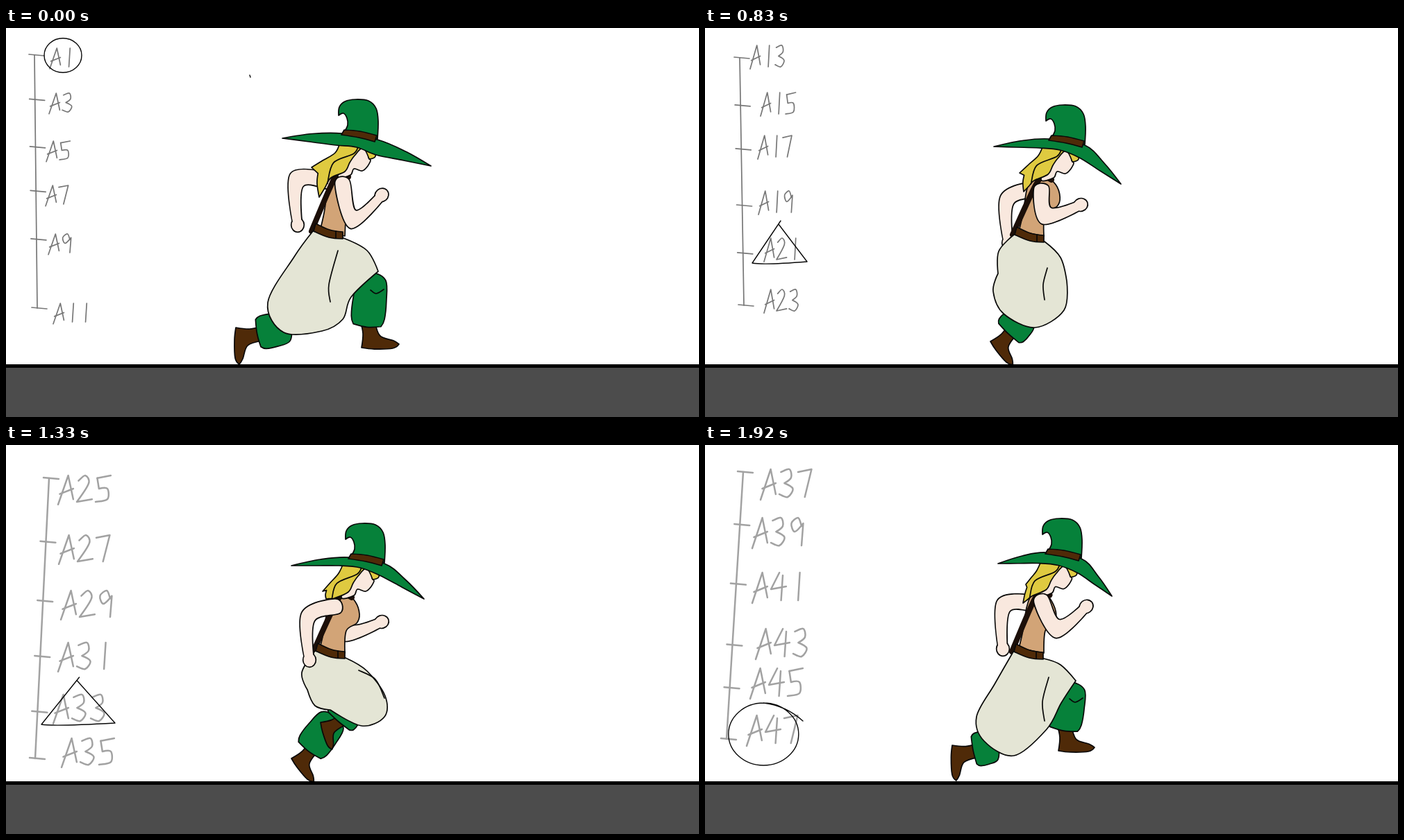
Write an HTML page with a canvas that moves like this. It is 998 px wide and 561 px high and loops after 2 s.

```html
<!DOCTYPE html>
<html lang="en">
<head>
<meta charset="utf-8">
<title>Run cycle</title>
<style>
html, body { margin: 0; height: 100%; overflow: hidden; background: #fff; }
canvas { display: block; width: 100vw; height: 100vh; }
</style>
</head>
<body>
<canvas id="stage" width="998" height="561"></canvas>
<script>
const ctx = document.getElementById('stage').getContext('2d');
const green = '#06813a', brown = '#4f2a08', skin = '#f9e8de', ink = '#080808';

// "x,y" is a smooth point, "x,y!" a corner
const points = s => s.split(' ').map(t => {
  const [x, y] = t.match(/-?\d+/g).map(Number);
  return { x, y, sharp: t.endsWith('!') };
});
const at = (x, y, sharp) => ({ x, y, sharp });
const corner = p => at(p.x, p.y, true);
const lerp = (a, b, k) => at(a.x + (b.x - a.x) * k, a.y + (b.y - a.y) * k, a.sharp);
const shift = (pts, o, k = 1) => pts.map(p => at(p.x + o.x * k, p.y + o.y * k, p.sharp));
// turn and scale local points by the vector (ux, uy), then move them to o
const place = (pts, o, ux, uy) => pts.map(p =>
  at(o.x + p.x * ux - p.y * uy, o.y + p.x * uy + p.y * ux, p.sharp));

// Key poses. head: offset, brim: tips, hair: tips, legs: heel, toe, knee
const pose = o => Object.fromEntries(Object.entries(o).map(([k, s]) => [k, points(s)]));
const reach = pose({
  head: '0,0', brim: '398,159 612,199', hair: '440,201 451,244', hip: '446,282',
  skirt: '520,321 536,351! 497,388 485,420 455,437 400,439 377,396 415,330',
  fold: '478,321 465,370 467,395',
  trail: '331,432 331,485 405,432', lead: '512,461 566,461 527,362'
});
const land = pose({
  head: '5,4', brim: '411,170 593,222', hair: '442,210 444,244', hip: '452,288',
  skirt: '505,326 526,362 520,388! 519,420 475,436 437,421 423,365 422,322',
  fold: '512,387 519,388 525,382',
  trail: '380,366 365,411 432,392', lead: '468,484 521,484 485,420'
});
const tuck = pose({
  head: '10,10', brim: '411,174 602,222', hair: '456,211 461,222', hip: '449,286',
  skirt: '520,326 546,362 545,392 512,405 467,382! 445,376 434,353! 426,328',
  fold: '508,325 532,338 545,365',
  trail: '453,400 466,440 495,380', lead: '411,452 440,488 470,397'
});
const drive = pose({
  head: '12,8', brim: '416,171 599,225', hair: '453,209 459,236', hip: '449,287',
  skirt: '512,331 521,365! 517,407 475,432 430,412 415,380 422,354! 423,322',
  fold: '493,346 487,370 489,392',
  trail: '453,380 466,420 490,370', lead: '411,452 440,488 459,417'
});
const push = pose({
  head: '7,3', brim: '422,171 586,218', hair: '462,201 458,228', hip: '448,287',
  skirt: '512,317 534,340! 513,372 492,410 445,448 402,427 391,392 417,345',
  fold: '495,335 486,370 489,398',
  trail: '356,433 357,484 418,434', lead: '509,441 561,441 527,350'
});

const mid = (p, q) => p.map((a, i) => lerp(a, q[i], .5));
const mix = (a, b) => Object.fromEntries(Object.keys(a).map(k => [k, mid(a[k], b[k])]));
const fall = mix(reach, land);
const bodies = [reach, fall, land, mix(land, tuck), tuck, push,
  reach, fall, land, mix(land, drive), drive, push];

// Near arm: shoulder, elbow, fist; gaps lie halfway between neighbours.
// The far arm follows half a cycle later.
const passing = '485,230 466,265 500,297';
const swing = ['484,222 500,276 541,241', '', passing, '', '478,232 435,248 437,310',
  '474,228 430,232 429,294', '470,222 419,219 420,284', '', passing, '',
  '484,230 492,271 541,255', '483,222 508,265 549,233'].map(s => s && points(s));
const arms = swing.map((a, i) => a || mid(swing[i - 1], swing[i + 1]));

const shapes = pose({
  crown: '487,150! 492,140 491,130 486,123 479,126! 480,114 488,106 503,103 522,105 533,116 536,134 535,160!',
  band: '487,147! 510,149 534,155! 531,164! 508,158 483,154!',
  face: '505,170 526,172 522,186 525,191 521,199! 513,206 501,203 496,212 478,215 490,185',
  belt: '0,0! 20,9 39,12! 39,22! 19,20 -3,11!',
  boot: '-2,-38! 2,-20 0,0! 18,2 44,1 53,-5! 45,-10 26,-17 19,-38!',
  pants: '-14,0 0,20 45,24 85,24 102,20! 106,0 102,-20! 85,-24 45,-24 0,-20'
});
const cuff = points('8,-33');

function trace(p, closed) {
  const n = p.length;
  const near = i => closed ? p[(i + n) % n] : p[Math.max(0, Math.min(n - 1, i))];
  const handle = (i, d) => {
    const q = near(i), k = q.sharp ? 0 : d / 6;
    return [q.x + (near(i + 1).x - near(i - 1).x) * k, q.y + (near(i + 1).y - near(i - 1).y) * k];
  };
  ctx.moveTo(p[0].x, p[0].y);
  for (let i = 0; i < (closed ? n : n - 1); i++) {
    const b = near(i + 1);
    ctx.bezierCurveTo(...handle(i, 1), ...handle(i + 1, -1), b.x, b.y);
  }
  if (closed) ctx.closePath();
}
function shape(p, fill) {
  ctx.beginPath();
  trace(p, true);
  ctx.fillStyle = fill;
  ctx.fill();
  ctx.stroke();
}
function line(p) {
  ctx.beginPath();
  trace(p, false);
  ctx.stroke();
}
function pen(color, width) {
  ctx.strokeStyle = color;
  ctx.lineWidth = width;
}
const outline = () => pen(ink, 1.7);

function arm([s, e, f]) {
  const a1 = Math.atan2(e.y - s.y, e.x - s.x), a2 = Math.atan2(f.y - e.y, f.x - e.x);
  const turn = Math.atan2(Math.sin(a2 - a1), Math.cos(a2 - a1)) / 2;
  const side = (p, a, r) => at(p.x - Math.sin(a) * r, p.y + Math.cos(a) * r);
  const r = 8.5 / Math.max(Math.cos(turn), .65);
  const sleeve = k => [side(s, a1, 10 * k), side(e, a1 + turn, r * k), corner(side(f, a2, 6 * k))];
  pen(ink, 3.4);
  ctx.beginPath();
  trace([...sleeve(1), ...sleeve(-1).reverse()], true);
  ctx.moveTo(f.x, f.y);
  const fist = new Path2D();
  fist.ellipse(f.x, f.y, 9.5, 8.5, a2, 0, 7);
  ctx.stroke();
  ctx.stroke(fist);
  ctx.fillStyle = skin;
  ctx.fill();
  ctx.fill(fist);
  outline();
}

function leg([heel, toe, knee]) {
  const ux = (toe.x - heel.x) / 53, uy = (toe.y - heel.y) / 53;
  const [end] = place(cuff, heel, ux, uy);
  const dx = end.x - knee.x, dy = end.y - knee.y, len = Math.hypot(dx, dy);
  const puff = shapes.pants.map(p => at(p.x * len / 100, p.y, p.sharp));
  shape(place(shapes.boot, heel, ux, uy), brown);
  shape(place(puff, knee, dx / len, dy / len), green);
  if (heel.x > 500) line(shift(points('-2,16 6,21 17,15'), knee));
}

function hat([o], [left, right]) {
  const [l, r] = shift(points('484,152 535,161'), o);
  const under = shift(points('533,183 505,172 475,169'), o, .5);
  const top = lerp(l, left, .5), end = lerp(r, right, .5);
  shape([corner(left), at(top.x, top.y - 3), l, r, at(end.x + 2, end.y - 2), corner(right),
    lerp(right, under[0], .5), ...under, lerp(under[2], left, .5)], green);
  shape(shift(shapes.crown, o), green);
  return shift(shapes.band, o);
}

function hair([o], [high, low]) {
  const [root, back, nape, ...front] = shift(points('481,165! 474,180 468,216 ' +
    '488,207 495,194 502,184 514,173 523,189! 532,185 530,170!'), o, .5);
  const notch = lerp(lerp(high, low, .35), back, .18);
  const curl = lerp(lerp(high, low, .6), back, .05);
  shape([root, back, lerp(back, high, .5), corner(high), corner(notch), curl, corner(low),
    lerp(low, nape, .5), nape, ...front], '#dfca40');
  line([...shift(points('508,168 501,181'), o, .5), lerp(back, nape, .4), lerp(low, nape, .7)]);
}

function impact() {
  pen(ink, 1.3);
  for (let k = 0; k < 5; k++)
    for (const [a, r] of [[Math.PI + .06 + k * .16, 46], [-.06 - k * .23, 46 - k * 2.5]])
      line([r, r + 5].map(d => at(493 + d * Math.cos(a), 485 + d * Math.sin(a))));
}

function runner(i) {
  const b = bodies[i], [o] = b.head, [hip] = b.hip, bust = o.x * 1.1;
  outline();
  arm(arms[(i + 6) % 12]);
  leg(b.lead);
  leg(b.trail);
  shape([...points('469,217! 488,212'), at(492 + bust, 226), at(498 + bust, 244), at(494 + bust, 257),
    ...points('490,268 488,300! 452,293! 458,267 463,235')], '#d2a477');
  pen('#1c0f08', 8);
  line([...shift(points('493,215 482,211 470,223'), o, .5), at(hip.x - 6, hip.y + 11)]);
  outline();
  shape([at(hip.x - 4, hip.y + 11, true), at(hip.x + 40, hip.y + 21, true), ...b.skirt], '#e4e5d5');
  line(b.fold);
  shape(shift(shapes.belt, hip), brown);
  line(shift(points('29,11 29,21'), hip));
  shape(shift(shapes.face, o, .5), skin);
  arm(arms[i]);
  hair(b.head, b.hair);
  shape(hat(b.head, b.brim), brown);
  if (b === land) impact();
}

const glyphs = {
  A: '0,11! 6,0! 9,9!|1,7! 9,5!',
  1: '6,0! 5,10!',
  2: '1,2 5,0 7,3 0,10! 9,9!',
  3: '1,1 6,0 7,3 3,5! 8,7 5,10 0,9',
  4: '5,0! 0,6! 9,5!|7,1! 6,10!',
  5: '1,1! 2,5! 7,5 7,9 0,10|1,1! 9,0!',
  7: '0,1! 8,0! 4,10!',
  9: '7,3 5,0 1,2 3,5 8,2! 7,10!'
};
// spine: its ends, rows: top left of each label, step and h: letter advance and height
const charts = [
  { spine: '41,39 45,404', rows: '63,29 62,94 58,163 57,227 61,297 68,397', step: 19, h: 27 },
  { spine: '50,43 56,400', rows: '65,25 80,93 76,155 77,235 85,303 85,377', step: 18, h: 31 },
  { spine: '62,48 42,452', rows: '75,44 76,130 79,210 75,285 68,360 80,423', step: 27, h: 38 },
  { spine: '55,39 31,424', rows: '80,35 68,105 68,184 73,265 65,322 60,390', step: 27, h: 40 }
];

function mark(i, { x, y }, w, h) {
  const cx = x + w / 2, cy = y + h / 2, kind = i % 6;
  pen(ink, 1.4);
  ctx.beginPath();
  if (kind === 0) ctx.ellipse(cx, cy - 3, w / 2 + 8, h / 2 + 7 + w / 9, 0, 0, 7);
  if (kind === 5) {
    ctx.ellipse(cx - w / 5, cy + 7, w / 2 + 10, h / 2 + 25, 0, 0, 7);
    ctx.moveTo(cx - w / 5, cy - h / 2 - 18);
    ctx.quadraticCurveTo(cx + w / 5, cy - h / 2 - 14, cx + w / 2, cy - h / 2 + 8);
  }
  if (kind === 2 || kind === 4) {
    ctx.moveTo(cx - 3, y - 25);
    ctx.lineTo(x - 17, y + h + 5);
    ctx.quadraticCurveTo(x, y + h + 8, x + w + 8, y + h + 3);
    ctx.lineTo(cx - 6, y - 20);
  }
  ctx.stroke();
}

function chart(i) {
  const c = Math.floor(i / 6), { spine, rows, step, h } = charts[c];
  const ends = points(spine), spots = points(rows);
  pen(...(c < 2 ? ['#777', 1.7] : ['#a2a2a2', 2.5]));
  line(ends);
  spots.forEach((p, row) => {
    const tick = lerp(...ends, (p.y - spots[0].y) / (spots[5].y - spots[0].y));
    line(shift(points('-8,-1 14,1'), tick));
    [...'A' + (c * 12 + row * 2 + 1)].forEach((ch, k) => glyphs[ch].split('|').forEach(s =>
      line(points(s).map(q => at(p.x + (k + q.x * .09) * step, p.y + q.y * h / 10, q.sharp)))));
  });
  mark(i, spots[i % 6], step * (c ? 3 : 2), h);
  if (c === 0) line(points('351,68 352,71'));
}

function frame() {
  const t = performance.now() % 2000;
  const i = Math.floor((Math.floor(t / 10) + .5) * .12); // 24 drawings on a 10 ms grid
  ctx.fillStyle = '#fff';
  ctx.fillRect(0, 0, 998, 561);
  ctx.lineJoin = ctx.lineCap = 'round';
  chart(i);
  runner(i % 12);
  ctx.fillStyle = '#4c4c4c';
  ctx.fillRect(0, 488, 998, 73);
  ctx.fillStyle = '#000';
  ctx.fillRect(0, 485, 998, 5);
  requestAnimationFrame(frame);
}
frame();
</script>
</body>
</html>
```
